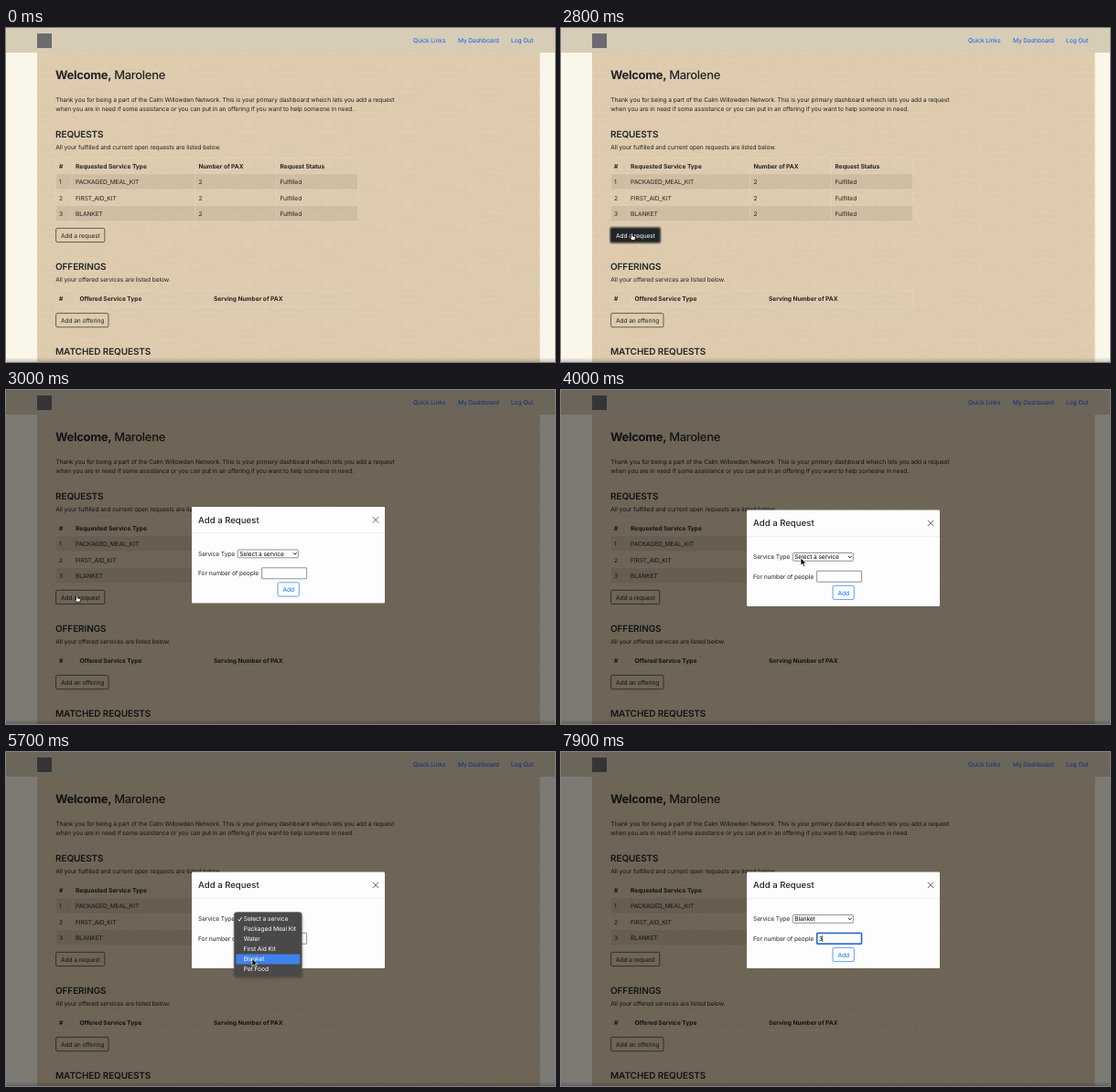
Animation, 600 px wide and 366 px high, one loop 8000 ms. Source, as an HTML page:

```html
<!DOCTYPE html>
<html lang="en">
<head>
<meta charset="utf-8">
<title>Dashboard</title>
<style>
  html, body { margin: 0; width: 100%; height: 100%; overflow: hidden; background: #fbf6ea; }
  svg { display: block; width: 600px; height: 366px; }
  text {
    font: 400 6.67px Inter, "Open Sans", sans-serif;
    letter-spacing: -.1px; fill: #212529;
    text-rendering: geometricPrecision; white-space: pre;
  }
  .link { fill: #1560ee; }
  .th { font-weight: 700; letter-spacing: -.05px; }
  .h4 { font-size: 10px; font-weight: 600; letter-spacing: -.1px; }
  .h2 { font-size: 13px; font-weight: 500; letter-spacing: -.3px; }
  .bold { font-weight: 700; }
  .title { font-size: 9.6px; font-weight: 500; letter-spacing: 0; }
  .blue { fill: #0d6efd; }
  .black { fill: #000; }
  .item { fill: #fff; }
</style>
</head>
<body>
<svg viewBox="0 0 600 366" xmlns="http://www.w3.org/2000/svg">
  <defs>
    <pattern id="waves" width="88" height="44" patternUnits="userSpaceOnUse">
      <g id="arcs" fill="none" stroke="#8a6a3c" stroke-opacity=".03" stroke-width="2"></g>
    </pattern>
    <linearGradient id="edge" x2="0" y2="1">
      <stop offset="0" stop-color="#000" stop-opacity="0"/>
      <stop offset="1" stop-color="#000" stop-opacity=".2"/>
    </linearGradient>
    <filter id="soft" x="-20%" y="-20%" width="140%" height="140%"><feGaussianBlur stdDeviation="1.6"/></filter>
  </defs>
  <g id="page"></g>
  <rect id="shade" width="600" height="366"/>
  <g id="modal"></g>
  <g id="menu"></g>
  <g id="arrow">
    <path d="M0 0V8.2L1.9 6.5L3.2 9.4L4.6 8.8L3.3 5.9H5.9Z" fill="#000" stroke="#fff" stroke-width=".7"/>
  </g>
  <g id="hand">
    <path d="M-.9 .4Q0-.7 .8 .4V3L3.4 3.6Q4.2 4 3.9 5.2L3.3 7.4H-.3L-2.2 5Q-2 4-.9 4.7Z" fill="#fff" stroke="#111" stroke-width=".9"/>
  </g>
  <g id="beam">
    <path d="M-1.5-4Q0-4 0-3Q0-4 1.5-4M0-3V3M-1.5 4Q0 4 0 3Q0 4 1.5 4" fill="none" stroke="#222" stroke-width=".7"/>
  </g>
</svg>
<script>
const NS = 'http://www.w3.org/2000/svg';
const $ = id => document.getElementById(id);
const INK = '#212529', GREY = '#767676', BLUE = '#0d6efd';

function add(parent, tag, attrs, str) {
  const el = document.createElementNS(NS, tag);
  for (const k in attrs) el.setAttribute(k, attrs[k]);
  if (str) el.textContent = str;
  return parent.appendChild(el);
}
const text = (g, x, y, str, cls = '') => add(g, 'text', { x, y, class: cls }, str);
const box = (g, x, y, width, height, more) => add(g, 'rect', { x, y, width, height, ...more });
const path = (g, d, stroke, w) => add(g, 'path', { d, fill: 'none', stroke, 'stroke-width': w });
const outline = (stroke, rx, w = .65) => ({ fill: 'none', stroke, rx, 'stroke-width': w });
const show = (el, on) => el.setAttribute('visibility', on ? 'visible' : 'hidden');
const place = (el, x, y) => el.setAttribute('transform', `translate(${x} ${y})`);
const ramp = (t, start, span) => Math.min(1, Math.max(0, (t - start) / span));

function table(g, y, rows, cols) {
  const h = 17.4;
  for (let r = 1; r < rows.length; r += 2)
    box(g, 54.5, y + r * h, 330, h, { fill: '#000', opacity: .065 });
  let d = '';
  for (let r = 0; r <= rows.length; r++) d += `M54.5 ${y + r * h}h330`;
  for (const x of [54.5, ...cols.slice(1).map(c => c - 4), 384.5]) d += `M${x} ${y}v${rows.length * h}`;
  path(g, d, 'rgba(222,226,230,.5)', .6);
  rows.forEach((row, r) => row.forEach((s, i) =>
    text(g, cols[i], y + r * h + 11.6, s, r ? '' : 'th')));
}

// Page
for (const [cx, cy] of [[0, 44], [88, 44], [44, 22], [44, 66]])
  for (const r of [14, 26, 38]) add($('arcs'), 'path', { d: `M${cx - r} ${cy}a${r} ${r * .55} 0 0 1 ${2 * r} 0` });

const page = $('page');
box(page, 0, 0, 600, 366, { fill: '#fbf6ea' });
box(page, 34, 27, 549.5, 339, { fill: '#dfccae' });
box(page, 34, 27, 549.5, 339, { fill: 'url(#waves)' });
box(page, 0, 0, 600, 27, { fill: '#d7ccb5' });
box(page, 34, 6, 16, 16, { fill: '#6b6b70' });
text(page, 445, 15.8, 'Quick Links', 'link');
text(page, 494, 15.8, 'My Dashboard', 'link');
text(page, 552, 15.8, 'Log Out', 'link');

text(page, 54, 56.2, 'Welcome,', 'h2 bold');
text(page, 118.2, 56.2, 'Marolene', 'h2');
text(page, 54.3, 80.5, 'Thank you for being a part of the Calm Willowden Network. This is your primary dashboard wheich lets you add a request');
text(page, 54.3, 90.6, 'when you are in need if some assistance or you can put in an offering if you want to help someone in need.');

text(page, 54, 120, 'REQUESTS', 'h4');
text(page, 54.3, 133, 'All your fulfilled and current open requests are listed below.');
table(page, 142.3, [
  ['#', 'Requested Service Type', 'Number of PAX', 'Request Status'],
  ['1', 'PACKAGED_MEAL_KIT', '2', 'Fulfilled'],
  ['2', 'FIRST_AID_KIT', '2', 'Fulfilled'],
  ['3', 'BLANKET', '2', 'Fulfilled']
], [58, 76, 210.5, 299.5]);
const ring = box(page, 53.6, 218.4, 55.2, 17.2, outline('rgba(33,37,41,.5)', 2.4, 1.6));
const fill = box(page, 54.6, 219.4, 53.2, 15.2, { fill: INK, rx: 1.6 });
box(page, 54.6, 219.4, 53.2, 15.2, outline(INK, 1.6));
const label = text(page, 60, 229.5, 'Add a request');

text(page, 54, 265.3, 'OFFERINGS', 'h4');
text(page, 54.3, 278.2, 'All your offered services are listed below.');
table(page, 287.8, [['#', 'Offered Service Type', 'Serving Number of PAX']], [58, 80.5, 227]);
box(page, 54.6, 312.6, 57.4, 15.2, outline(INK, 1.6));
text(page, 60, 322.8, 'Add an offering');
text(page, 54, 358.3, 'MATCHED REQUESTS', 'h4');
box(page, 0, 361, 600, 5, { fill: 'url(#edge)' });

// Dialog
const modal = $('modal');
box(modal, 203, 131.5, 211, 105.5, { fill: '#fdfdfd', rx: 1.2 });
path(modal, 'M203 160.3h211', '#dee2e6', .6);
text(modal, 210, 149.4, 'Add a Request', 'title');
path(modal, 'M400.8 142.7l6.4 6.4m0-6.4l-6.4 6.4', '#555', .9);
text(modal, 210, 185.2, 'Service Type');
box(modal, 253.3, 178.5, 66, 8.8, { ...outline(GREY, 1, .8), fill: '#fff' });
const choice = text(modal, 255.2, 185.2, 'Select a service', 'black');
path(modal, 'M314 181.9l1.8 1.9l1.8-1.9', '#111', 1);
text(modal, 210, 206.6, 'For number of people');
box(modal, 279.6, 198.3, 49, 12, outline(GREY, .5, .8));
const focus = box(modal, 279.7, 198.4, 48.8, 11.8, outline('#1f63d3', 1, 1.5));
const typed = text(modal, 281.8, 206.7, '3', 'black');
const caret = path(modal, 'M0 200.8v7.2', '#000', .6);
box(modal, 297, 214.4, 23.3, 15.2, outline(BLUE, 1.6));
text(modal, 302.5, 224.6, 'Add', 'blue');

// Option list
const menu = $('menu');
box(menu, 249.5, 177, 74, 70, { fill: '#000', opacity: .45, rx: 3, filter: 'url(#soft)' });
box(menu, 249.3, 175.5, 74, 70.8, { fill: '#4a4948', stroke: '#6b6a68', 'stroke-width': .4, rx: 3 });
const bar = box(menu, 251.3, 0, 70, 11, { fill: '#3f82ea', rx: 1.5 });
path(menu, 'M253.8 183.4l1.4 1.8l2.5-4.4', '#fff', .9);
['Select a service', 'Packaged Meal Kit', 'Water', 'First Aid Kit', 'Blanket', 'Pet Food']
  .forEach((s, i) => text(menu, 259.8, 185.3 + i * 11, s, 'item'));

// Pointer path: time, x, y
const track = [
  [1600, 150, 360], [2300, 80, 228], [2700, 77.5, 225], [3050, 77.5, 225],
  [3500, 168, 213], [3900, 260, 185], [4000, 262, 184], [4500, 262, 184],
  [5400, 268, 226], [5700, 269, 226.5], [6500, 270, 227], [7000, 307, 204], [7500, 308, 204]
];
function pointer(t) {
  const i = track.findIndex(k => k[0] > t);
  if (i < 1) return null;
  const [t0, x0, y0] = track[i - 1], [t1, x1, y1] = track[i];
  const p = (t - t0) / (t1 - t0), e = p * p * (3 - 2 * p);
  return { x: x0 + (x1 - x0) * e, y: y0 + (y1 - y0) * e };
}

function draw(ms) {
  const t = Math.floor(ms % 8000 / 100) * 100;
  const at = pointer(t);
  const onButton = at && t < 3100 && at.x > 54 && at.x < 108 && at.y > 219 && at.y < 235;
  const inField = at && t > 6600 && at.y < 210;

  // Button
  const hover = onButton && t < 2900;
  fill.setAttribute('opacity', hover ? 1 : t === 2900 ? .33 : 0);
  label.style.fill = hover ? '#fff' : INK;
  show(ring, t >= 2700 && t < 2900);

  // Dialog fades and drops in
  $('shade').setAttribute('opacity', ramp(t, 2800, 114) * .5);
  modal.setAttribute('opacity', ramp(t, 2800, 125));
  place(modal, 0, t < 3000 ? -9.5 : t < 3100 ? -3.5 : 0);

  // Option list
  const listed = t >= 4200 && t < 6300;
  menu.setAttribute('opacity', !listed ? 0 : t === 6200 ? .5 : 1);
  if (listed && at) {
    const row = Math.max(0, Math.min(5, Math.floor((at.y - 177.5) / 11)));
    bar.setAttribute('y', 177.5 + row * 11);
  }
  choice.textContent = t < 6200 ? 'Select a service' : 'Blanket';

  // Number field
  const done = t >= 7900;
  show(focus, t >= 7000);
  show(typed, done);
  show(caret, done || t >= 7000 && t < 7500);
  place(caret, done ? 285.7 : 282, 0);

  const shape = inField ? 'beam' : onButton ? 'hand' : 'arrow';
  for (const id of ['arrow', 'hand', 'beam']) {
    show($(id), at && id === shape);
    if (at) place($(id), at.x, at.y);
  }
}

function tick() {
  draw(performance.now());
  requestAnimationFrame(tick);
}
tick();
</script>
</body>
</html>
```
